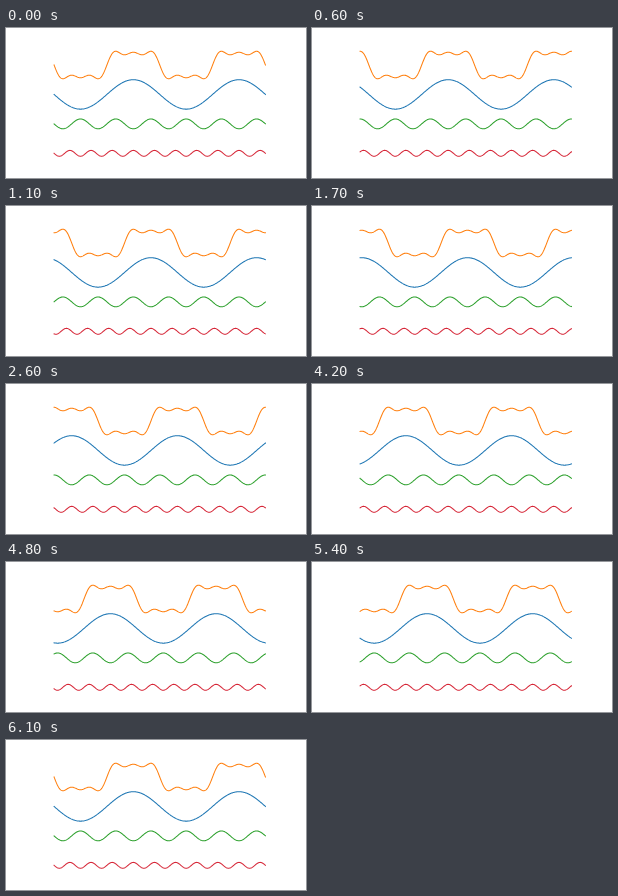
These frames come from a looping animation (300x150 px, 6.2 s). An HTML page:

```html
<!DOCTYPE html>
<html lang="en">
<head>
<meta charset="utf-8">
<title>Square wave harmonics</title>
<style>
  html, body { margin: 0; width: 100%; height: 100%; overflow: hidden; background: #fff; }
  svg { display: block; width: 300px; height: 150px; }
  path { fill: none; stroke-width: 1.04; stroke-linecap: square; stroke-linejoin: round; }
</style>
</head>
<body>
<svg id="plot" viewBox="0 0 300 150"></svg>
<script>
const STEP_MS = 100, STEPS = 62, CYCLE = 60;
const LEFT = 48.07, RIGHT = 259.43, UNIT = 14.72, TOP = 36.99;
const POINTS = 400;

const harmonic = n => a => Math.sin(n * a) / n;
const parts = [1, 3, 5].map(harmonic);
const total = a => parts.reduce((sum, f) => sum + f(a), 0);

const plot = document.getElementById('plot');
const addWave = (f, color, row) => {
  const path = document.createElementNS('http://www.w3.org/2000/svg', 'path');
  path.setAttribute('stroke', color);
  plot.append(path);
  return { f, path, y: TOP + row * 2 * UNIT };
};

const waves = [
  addWave(total, '#ff7f0e', 0),
  addWave(parts[0], '#1f77b4', 1),
  addWave(parts[1], '#2ca02c', 2),
  addWave(parts[2], '#d62738', 3)
];

function trace({ f, y }, phase) {
  let d = '';
  for (let i = 0; i <= POINTS; i++) {
    const u = i / POINTS;
    const px = LEFT + u * (RIGHT - LEFT);
    const py = y + UNIT * f(4 * Math.PI * u - phase);
    d += (i ? 'L' : 'M') + px.toFixed(2) + ' ' + py.toFixed(2);
  }
  return d;
}

let shown = -1;
const start = performance.now();

function draw(now) {
  const step = Math.floor(Math.max(0, now - start) / STEP_MS) % STEPS;
  if (step !== shown) {
    shown = step;
    // The opening pose is held for one extra step.
    const phase = Math.max(0, step - 1) / CYCLE * 2 * Math.PI;
    for (const wave of waves) wave.path.setAttribute('d', trace(wave, phase));
  }
  requestAnimationFrame(draw);
}
draw(start);
</script>
</body>
</html>
```
